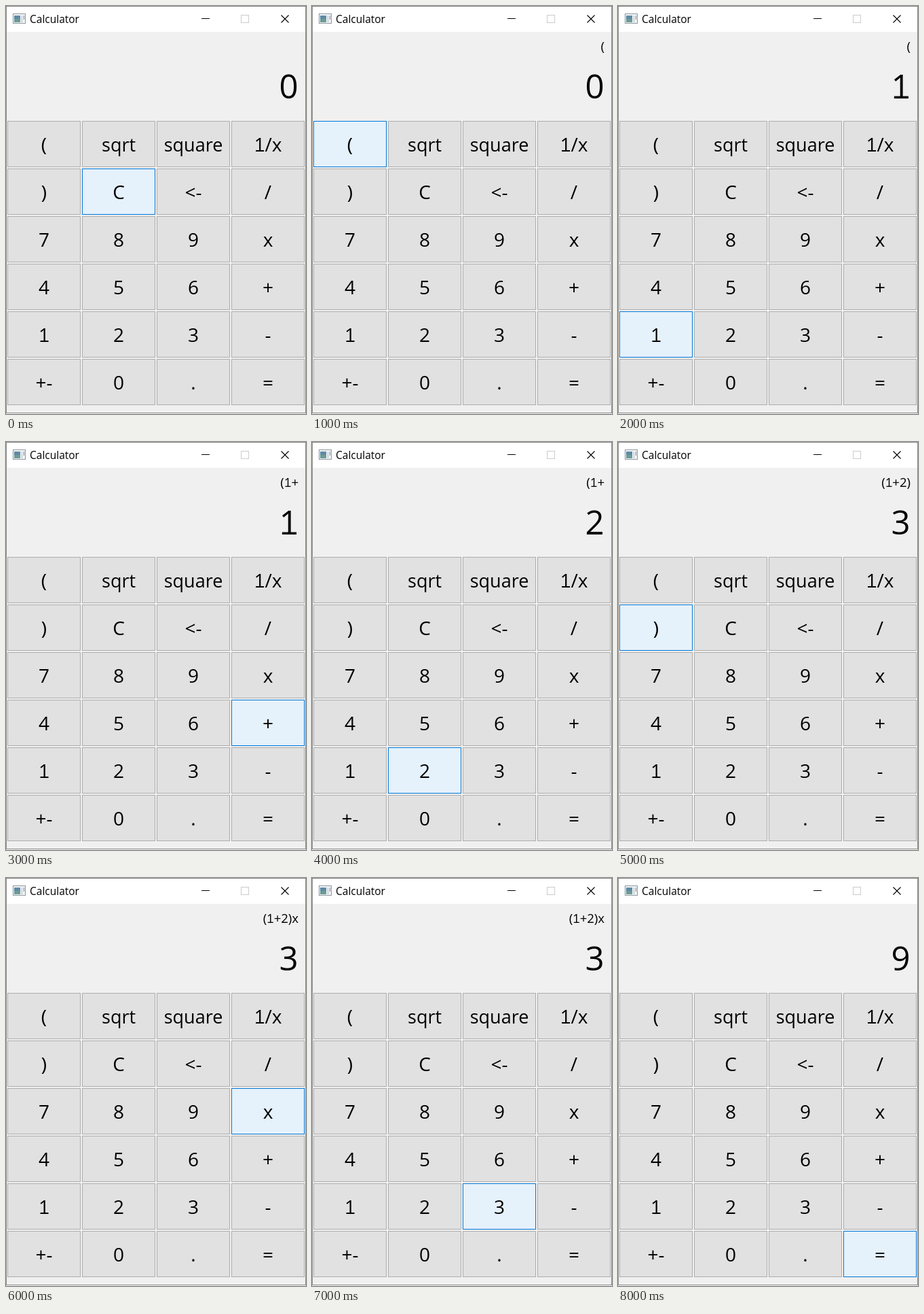
An HTML page for the animation above (9 s loop, 442x600 px).

```html
<!DOCTYPE html>
<html lang="en">
<head>
<meta charset="utf-8">
<title>Calculator</title>
<style>
  html, body { margin: 0; width: 100%; height: 100%; overflow: hidden; }
  svg { display: block; width: 442px; height: 600px; }
  text { font-family: "Open Sans", "Noto Sans", sans-serif; fill: #000; white-space: pre; }
</style>
</head>
<body>
<svg id="stage" viewBox="0 0 442 600" shape-rendering="crispEdges"></svg>
<script>
const SVG_NS = "http://www.w3.org/2000/svg";
const stage = document.getElementById("stage");
const KEYS = ["(", "sqrt", "square", "1/x", ")", "C", "<-", "/", "7", "8", "9", "x",
              "4", "5", "6", "+", "1", "2", "3", "-", "+-", "0", ".", "="];
const STEP = 1000;
// [pressed key, expression, display]
const STEPS = [
  ["C", "", "0"], ["(", "(", "0"], ["1", "(", "1"],
  ["+", "(1+", "1"], ["2", "(1+", "2"], [")", "(1+2)", "3"],
  ["x", "(1+2)x", "3"], ["3", "(1+2)x", "3"], ["=", "", "9"]
];

function add(tag, attrs, parent = stage) {
  const node = document.createElementNS(SVG_NS, tag);
  for (const name in attrs) node.setAttribute(name, attrs[name]);
  return parent.appendChild(node);
}

function rect(x, y, width, height, fill, stroke) {
  const inset = stroke ? 0.5 : 0;
  return add("rect", {
    x: x + inset, y: y + inset, width: width - 2 * inset, height: height - 2 * inset,
    fill, stroke: stroke || "none"
  });
}

// A text label whose digit 1 stands on a flat foot.
function label(x, y, size, anchor) {
  const text = add("text", { x, y, "font-size": size, "text-anchor": anchor });
  const feet = add("path", { "shape-rendering": "auto" });
  return value => {
    if (text.textContent === value && value) return;
    text.textContent = value;
    let d = "";
    [...value].forEach((char, i) => {
      if (char !== "1") return;
      const left = text.getStartPositionOfChar(i).x + 0.09 * size;
      d += `M${left} ${y}h${0.43 * size}v${-0.07 * size}h${-0.43 * size}z`;
    });
    feet.setAttribute("d", d);
  };
}

function drawWindow() {
  rect(0, 0, 442, 599, "#f0f0f0", "#868686");
  rect(0, 599, 442, 1, "#fff");
  rect(1, 1, 440, 37, "#fff");

  rect(10, 11, 19, 15, "#f4f6f8", "#8d969c");
  rect(12, 14, 9, 10, "#5f8aa3");
  rect(12, 19, 9, 5, "#6c9a96");
  rect(22, 14, 3, 10, "#d5dbe0");
  rect(26, 14, 1, 6, "#7f8c96");

  label(35, 25, 15.5, "start")("Calculator");
  rect(288, 18, 12, 1, "#000");
  rect(346, 13, 12, 12, "none", "#ccc");
  add("path", {
    d: "M405.5 13.5l11 11m0-11l-11 11", stroke: "#000", "stroke-width": 1.1,
    "shape-rendering": "auto"
  });
}

drawWindow();

const buttons = KEYS.map((key, i) => {
  const x = 2 + 110 * (i % 4), y = 169 + 70 * Math.floor(i / 4);
  const face = rect(x, y, 108, 68, "#e1e1e1", "#adadad");
  label(x + 54, y + 45, /^[a-z]{2,}$/.test(key) ? 27 : 28, "middle")(key);
  return { key, face };
});
const showExpression = label(431, 66, 18.5, "end");
const showDisplay = label(430.5, 136, 49, "end");

let current = -1;
function render(time) {
  const index = Math.floor(time / STEP) % STEPS.length;
  if (index === current) return;
  current = index;
  const [pressed, expression, display] = STEPS[index];
  for (const { key, face } of buttons) {
    const active = key === pressed;
    face.setAttribute("fill", active ? "#e5f1fb" : "#e1e1e1");
    face.setAttribute("stroke", active ? "#0078d7" : "#adadad");
  }
  showExpression(expression);
  showDisplay(display);
}

const start = performance.now();
function tick() {
  render(performance.now() - start);
  requestAnimationFrame(tick);
}
tick();
</script>
</body>
</html>
```
